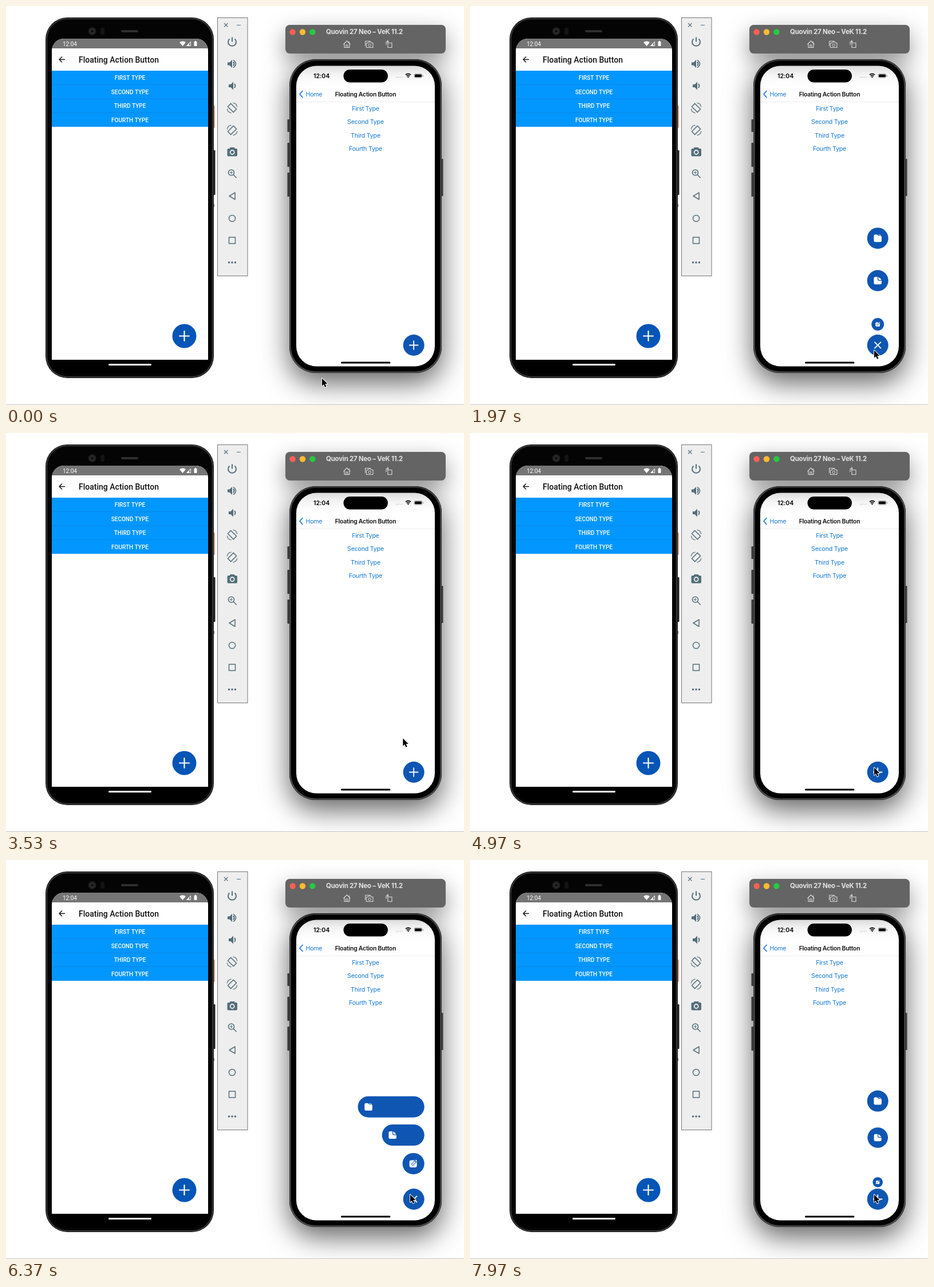
These frames come from a looping animation (800x697 px, 8 s). An HTML page with a canvas:

```html
<!DOCTYPE html>
<html lang="en">
<head>
<meta charset="utf-8">
<title>Floating Action Button</title>
<style>
html, body { margin: 0; width: 100%; height: 100%; overflow: hidden; background: #fff; }
canvas { display: block; }
</style>
</head>
<body>
<canvas id="stage" width="800" height="697"></canvas>
<script>
const LOOP = 8000;
const UNIT = 0.619; // stage pixels per phone point
const BLUE = '#0f56b3', LINK = '#1478d4', SLATE = '#546e7a';
const ROBOTO = 'Roboto, sans-serif', INTER = 'Inter, sans-serif';
const FAB = { x: 712.2, y: 592.5, r: 18.5 };

const stage = document.getElementById('stage').getContext('2d');
const backdrop = document.createElement('canvas');
backdrop.width = 800;
backdrop.height = 697;
let g = backdrop.getContext('2d');

// ---------- drawing helpers ----------
function box(x, y, w, h, r, fill) {
  g.beginPath();
  g.roundRect(x, y, w, h, r);
  g.fillStyle = fill;
  g.fill();
}
function frame(x, y, w, h, r, color, width) {
  g.beginPath();
  g.roundRect(x, y, w, h, r);
  g.strokeStyle = color;
  g.lineWidth = width;
  g.stroke();
}
function disc(x, y, r, fill) {
  g.beginPath();
  g.arc(x, y, r, 0, 7);
  g.fillStyle = fill;
  g.fill();
}
function line(d, color, width = 1, x = 0, y = 0, cap = 'butt') {
  g.save();
  g.translate(x, y);
  g.strokeStyle = color;
  g.lineWidth = width;
  g.lineCap = cap;
  g.lineJoin = 'round';
  g.stroke(new Path2D(d));
  g.restore();
}
function shape(d, color, x = 0, y = 0) {
  g.save();
  g.translate(x, y);
  g.fillStyle = color;
  g.fill(new Path2D(d), 'evenodd');
  g.restore();
}
function text(str, x, cy, size, color, font, weight = 400, align = 'left', track = 0) {
  g.font = `${weight} ${size}px ${font}`;
  g.letterSpacing = track * size + 'px';
  g.textAlign = align;
  g.fillStyle = color;
  g.fillText(str, x, cy + 0.36 * size);
}
function plus(x, y, arm, width, angle = 0) {
  g.save();
  g.translate(x, y);
  g.rotate(angle);
  line(`M${-arm} 0H${arm}M0 ${-arm}V${arm}`, '#fff', width, 0, 0, 'round');
  g.restore();
}

// ---------- backdrop ----------
function drawAndroid() {
  box(362, 174, 3, 39, 1, '#dc9a8c');
  box(362, 252, 3.5, 78, 1, '#202020');
  box(362, 346, 2, 5, 0, '#777');
  box(69, 20, 294, 630, 38, '#1c1c1c');
  frame(71, 22, 290, 626, 36, '#4a4a4a', 1);
  box(72.5, 23.5, 287, 623, 34.5, '#040404');

  disc(150.5, 44, 7, '#1d1d1d');
  disc(150.5, 44, 4.5, '#2c2c2c');
  disc(150.5, 44, 2.2, '#0c0c0c');
  box(165, 38, 7, 12, 2, '#141414');
  box(201, 42, 30, 4, 2, '#2e2e2e');

  g.save();
  box(80, 57, 273, 561, [21, 21, 0, 0], '#fff');
  g.clip();
  box(80, 57, 273, 17, 0, '#757575');
  text('12:04', 99, 66, 10, '#fff', ROBOTO);
  g.restore();
  shape('M303 63.5Q308.500 59.500 314 63.500L308.500 70Z', '#fff');
  line('M315.500 69.500H322.500V62.500Z', '#fff', 1);
  shape('M315 70H320V65Z', '#fff');
  box(328.5, 62, 5, 8, 1, '#fff');
  box(330, 61, 2, 2, 0, '#fff');

  line('M103 93.500H93M98 88.500L93 93.500L98 98.500', '#111', 1.3);
  text('Floating Action Button', 127, 94, 14, '#111', ROBOTO, 500);

  box(80, 113, 273, 98, 0, '#0296ff');
  ['FIRST', 'SECOND', 'THIRD', 'FOURTH'].forEach((word, i) => {
    const y = 113 + i * 24.5;
    if (i) box(80, y - 0.5, 273, 1, 0, '#0a89e6');
    text(word + ' TYPE', 216.5, y + 12.6, 10, '#fff', ROBOTO, 500, 'center');
  });

  disc(311.5, 576.5, 21, '#0455b6');
  plus(311.5, 576.5, 8.5, 2.2);
  box(80, 618, 273, 24, [0, 0, 22, 22], '#000');
  box(179, 625, 75, 3, 1.5, '#fff');
}

function drawRotate(y, flip) {
  g.save();
  g.translate(395, y);
  g.scale(flip, 1);
  line('M-2.300 -7.600L7.600 2.300L2.300 7.600L-7.600 -2.300Z', SLATE, 1.5);
  line('M1.500 -8.800Q8 -7.800 8.800 -1.500M-1.500 8.800Q-8 7.800 -8.800 1.500', SLATE, 1.2);
  g.restore();
}

function drawToolPanel() {
  box(369, 20, 53.5, 452, 0, '#777');
  box(370, 21, 51.5, 450, 0, '#eee');
  line('M381 30L387.500 36.500M387.500 30L381 36.500M403 33.500H410', SLATE, 1.1);
  line('M-4.500 -5A7 7 0 1 0 4.500 -5M0 -8V0', SLATE, 2, 395, 62.5);
  const speaker = 'M-8 -2.500H-4.500L0 -7V7L-4.500 2.500H-8Z';
  shape(speaker, SLATE, 395, 101);
  line('M2 -3.500Q5 0 2 3.500', SLATE, 2, 395, 101);
  line('M2 -6.700Q11 0 2 6.700', SLATE, 1.6, 395, 101);
  shape(speaker, SLATE, 397, 139.5);
  line('M2 -3.500Q5 0 2 3.500', SLATE, 2, 397, 139.5);
  drawRotate(178, 1);
  drawRotate(217, -1);

  box(386.5, 249, 17.5, 13.5, 2, SLATE);
  box(391, 247, 8.5, 4, 1, SLATE);
  disc(395.2, 255.5, 4.4, '#eee');
  disc(395.2, 255.5, 2.6, SLATE);

  line('M3.500 -2A5 5 0 1 1 -6.500 -2A5 5 0 1 1 3.500 -2M2.500 2L7.500 7', SLATE, 1.6, 395, 293);
  line('M-4 -2H1M-1.500 -4.500V0.500', SLATE, 1.1, 395, 293);
  line('M5 -6V6L-5 0Z', SLATE, 1.5, 395, 332);
  line('M5.600 0A5.600 5.600 0 1 1 -5.600 0A5.600 5.600 0 1 1 5.600 0', SLATE, 1.5, 395, 371);
  line('M-5.500 -5.500H5.500V5.500H-5.500Z', SLATE, 1.5, 395, 409.5);
  for (let i = -1; i < 2; i++) disc(395 + i * 5.4, 448, 1.8, SLATE);
}

function withShadow(color, blur, dy, draw) {
  g.save();
  g.shadowColor = color;
  g.shadowBlur = blur;
  g.shadowOffsetY = dy;
  draw();
  g.restore();
}

function drawTitleBar() {
  withShadow('rgba(0,0,0,.42)', 38, 14, () => box(488, 33, 280, 50, 7.5, '#646464'));
  ['#ff5f57', '#febc2e', '#28c840'].forEach((c, i) => disc(500.6 + i * 17.4, 45.5, 5.2, c));
  text('Quovin 27 Neo – VeK 11.2', 559, 45, 11.5, '#e2e2e2', INTER, 700, 'left', -0.022);
  const ink = '#dcdcdc';
  line('M-6 0L0 -6L6 0M-4.500 -1.500V5.500H4.500V-1.500M-1.500 5.500V1H1.500V5.500M4 -2V-5', ink, 1.1, 595.5, 67);
  line('M-4.500 -2.500H-1.500L-.5 -4H3.500L4.500 -2.500H7V5.500H-4.500Z', ink, 1.1, 634, 67);
  line('M3.500 1.500A2.200 2.200 0 1 1 -.9 1.500A2.200 2.200 0 1 1 3.500 1.500M-6.500 3V-5.500H3', ink, 1, 634, 67);
  line('M-2 -2.500H5V5.500H-2ZM-5 1V-3.500Q-5 -5 -3.500 -5H-1M-3 -7L-1 -5L-3 -3', ink, 1.1, 669, 67);
}

function drawIphone() {
  withShadow('rgba(0,0,0,.62)', 48, 17, () => box(495, 93, 266, 548, 46, '#222'));
  [[198, 22], [239, 42], [291, 42]].forEach(([y, h]) => box(491.5, y, 4, h, 1, '#3a3a3a'));
  box(760, 267, 3.5, 65, 1, '#3a3a3a');
  box(495, 93, 266, 548, 46, '#2b2b2b');
  frame(496.5, 94.5, 263, 545, 44.5, '#555', 1.2);
  box(498, 96, 260, 542, 43, '#000');
  box(507, 104.5, 242, 525, 35, '#fff');

  box(589.5, 111, 77.5, 22.5, 11.25, '#000');
  text('12:04', 537, 122, 10.7, '#000', INTER, 600, 'left', -0.01);
  for (let i = 0; i < 4; i++) disc(682 + i * 3.2, 124.5, 0.8, '#bbb');
  line('M-4.600 -1.300Q0 -5 4.600 -1.300', '#000', 1.6, 702.5, 121.5);
  line('M-2.800 .9Q0 -1.500 2.800 .9', '#000', 1.5, 702.5, 121.5);
  shape('M-1.700 2.300Q0 .9 1.700 2.300L0 4Z', '#000', 702.5, 121.5);
  frame(713, 118.5, 14, 6.8, 2.2, '#999', 0.8);
  box(714, 119.5, 12, 4.8, 1.3, '#000');
  box(728, 120.5, 1, 2.8, 0.5, '#999');

  line('M518 148.500L513 154L518 159.500', LINK, 1.7, 0, 0, 'round');
  text('Home', 523.5, 154, 10.6, LINK, INTER, 400, 'left', -0.023);
  text('Floating Action Button', 628, 154, 10.5, '#111', INTER, 600, 'center', -0.025);
  box(507, 167, 242, 1, 0, '#ededed');
  drawLink('First', 0);
  drawLink('Third', 2);
  drawLink('Fourth', 3);
  box(585, 621.5, 86.5, 3, 1.5, '#000');
}

function drawLink(word, row) {
  text(word + ' Type', 628, 179.3 + row * 23.2, 10.7, LINK, INTER, 400, 'center', -0.023);
}

g.fillStyle = '#fff';
g.fillRect(0, 0, 800, 697);
drawIphone();
drawTitleBar();
drawAndroid();
drawToolPanel();
box(0, 696, 800, 1, 0, '#c2c2c2');

// ---------- motion ----------
const clamp = v => Math.min(1, Math.max(0, v));
function inOut(v) {
  v = clamp(v);
  return v < 0.5 ? 2 * v * v : 1 - 2 * (1 - v) * (1 - v);
}
// Damped spring: stiffness 100, damping 10, mass 1.
function spring(ms) {
  if (ms <= 0) return 0;
  const t = ms / 1000, w = Math.sqrt(75);
  return 1 - Math.exp(-5 * t) * (Math.cos(w * t) + 5 / w * Math.sin(w * t));
}
const cubic = (a, b, s) => 3 * a * s * (1 - s) ** 2 + 3 * b * s * s * (1 - s) + s ** 3;
function backInOut(v) {
  if (v <= 0 || v >= 1) return clamp(v);
  let lo = 0, hi = 1;
  for (let i = 0; i < 20; i++) {
    const mid = (lo + hi) / 2;
    if (cubic(0.68, 0.32, mid) < v) lo = mid; else hi = mid;
  }
  return cubic(-0.6, 1.6, lo);
}

const items = [
  { label: 'Edit File', icon: drawEdit, rise: 100, shutDelay: 0 },
  { label: 'New File', icon: drawFile, rise: 180, shutDelay: 65 },
  { label: 'New Folder', icon: drawFolder, rise: 260, shutDelay: 100 }
];
const menus = [
  { open: 1625, close: 2975, wide: false },
  { open: 5155, close: 7615, wide: true }
];
const pointerPath = [
  [30, 552, 650], [530, 716, 588], [700, 716, 588], [1230, 707, 576], [1400, 706, 601],
  [3300, 706, 601], [4090, 632, 204], [4450, 632, 204], [4960, 706, 584]
];

function pointerAt(t) {
  const next = pointerPath.findIndex(p => p[0] > t);
  if (next === 0) return pointerPath[0].slice(1);
  if (next < 0) return pointerPath[pointerPath.length - 1].slice(1);
  const [t0, x0, y0] = pointerPath[next - 1], [t1, x1, y1] = pointerPath[next];
  const k = inOut((t - t0) / (t1 - t0));
  return [x0 + (x1 - x0) * k, y0 + (y1 - y0) * k];
}

function drawFolder() {
  shape('M-6.800 -4.300Q-6.800 -6.500 -4.600 -6.500H-1.800Q-.8 -6.500 0 -5.600L1.200 -4.200H4.600Q6.800 -4.200 6.800 -2V4.200Q6.800 6.500 4.500 6.500H-4.500Q-6.800 6.500 -6.800 4.200Z', '#fff');
  line('M1.800 -5.800H3.500Q5 -5.800 5.500 -4.800', '#fff', 0.9, 0, 0, 'round');
}
function drawFile() {
  shape('M-6.800 -4Q-6.800 -6.500 -4.300 -6.500H-.3V-2.800Q-.3 .2 2.700 .2H6.800V4Q6.800 6.500 4.300 6.500H-4.300Q-6.800 6.500 -6.800 4ZM1 -6.300Q4.800 -4.800 6.300 -1.100H2.700Q1 -1.100 1 -2.800Z', '#fff');
}
function drawEdit() {
  box(-6.5, -6, 13, 12.6, 3.2, '#fff');
  line('M-2.300 2.600L4.700 -4.700', BLUE, 4.600);
  line('M-1.200 1.400L3.600 -3.600M5 -5L6 -6', '#fff', 2.6);
  shape('M-3.200 3.400L-2.500 .4L-.2 2.600Z', '#fff');
}

function drawItem(item, i, menu, t) {
  const shutAt = menu.close + (menu.wide ? 104 : 0) + item.shutDelay;
  const p = t < shutAt
    ? spring(t - menu.open - 200 + 100 * i)
    : 1 - backInOut((t - shutAt) / 500);
  const scale = clamp(p);
  if (scale < 0.01) return;
  const shutting = t >= menu.close;
  let grow = 0, alpha = 0;
  if (menu.wide) {
    const fold = (t - menu.close) / 100;
    grow = shutting ? 1 - inOut(fold) : spring(t - menu.open - 1200 + 100 * i);
    alpha = shutting ? 1 - inOut(fold) : clamp(spring(t - menu.open - 1200));
  }
  const r = FAB.r, w = 2 * r + 140 * UNIT * grow;
  g.save();
  g.translate(FAB.x, FAB.y - item.rise * UNIT * p);
  g.scale(scale, scale);
  box(r - w, -r, w, 2 * r, r, BLUE);
  g.clip();
  g.translate(2 * r - w, 0);
  if (alpha > 0) {
    g.globalAlpha = alpha;
    text(item.label, r, 0.3, 10.8, '#fff', INTER, 400, 'left', -0.02);
    g.globalAlpha = 1;
  }
  item.icon();
  g.restore();
}

function drawPointer(x, y) {
  const arrow = 'M0 0V13.200L3 10.400L5.100 15.200L7.400 14.200L5.300 9.500H9.500Z';
  line(arrow, '#fff', 1.8, x, y + 0.5);
  shape(arrow, '#000', x, y + 0.5);
}

function render(t) {
  g = stage;
  g.drawImage(backdrop, 0, 0);
  g.globalAlpha = 1 - 0.8 * (inOut((t - 4320) / 100) - inOut((t - 4480) / 250));
  drawLink('Second', 1);
  g.globalAlpha = 1;

  let turn = 0;
  for (const menu of menus) {
    turn += inOut((t - menu.open) / 300) - inOut((t - menu.close) / 300);
    if (t > menu.open) items.forEach((item, i) => drawItem(item, i, menu, t));
  }
  disc(FAB.x, FAB.y, FAB.r, BLUE);
  plus(FAB.x, FAB.y, 7.4, 1.8, turn * Math.PI / 4);
  drawPointer(...pointerAt(t));
}

const start = performance.now();
function tick() {
  render((performance.now() - start) % LOOP);
  requestAnimationFrame(tick);
}
tick();
</script>
</body>
</html>
```
